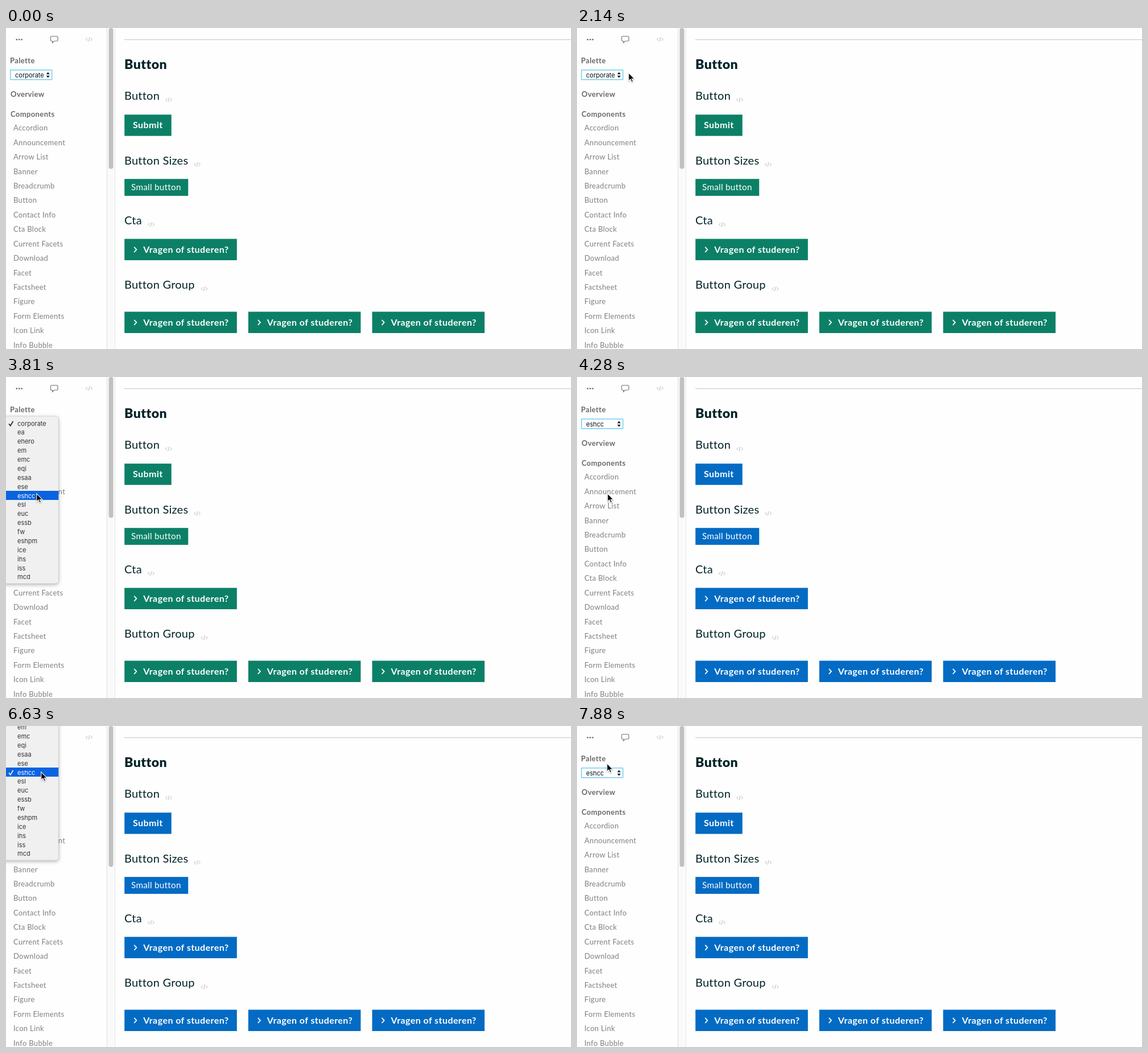
An HTML page that plays this animation: 993x564 px, repeating every 8 s.

```html
<!DOCTYPE html>
<html lang="en">
<head>
<meta charset="utf-8">
<title>Component styleguide</title>
<style>
  html, body { margin: 0; width: 100%; height: 100%; overflow: hidden; background: #fefefe; }
  svg { display: block; }
  text { font-family: Lato, "Open Sans", sans-serif; letter-spacing: .02em; white-space: pre; }
  .nav { font-size: 13px; fill: #808080; letter-spacing: .024em; }
  .section { font-size: 13px; font-weight: 700; fill: #6a6a6a; letter-spacing: .03em; }
  .title { font-size: 23px; font-weight: 900; fill: #002328; }
  .heading { font-size: 20px; font-weight: 400; fill: #002328; letter-spacing: .012em; }
  .label { font-size: 16px; font-weight: 700; fill: #fff; letter-spacing: .027em; }
  .small { font-size: 15.2px; fill: #fff; }
  .system { font: 11px Inter, sans-serif; letter-spacing: 0; fill: #333; }
</style>
</head>
<body>
<svg id="stage" width="993" height="564" viewBox="0 0 993 564"></svg>
<script>
const LOOP = 8000;
const GREEN = [12, 128, 102], BLUE = [3, 107, 195], DARK = [0, 35, 40];
const ROW = 15.88, MENU_TOP = 73.4, SELECTED = 8;

const components = ['Accordion', 'Announcement', 'Arrow List', 'Banner', 'Breadcrumb', 'Button',
  'Contact Info', 'Cta Block', 'Current Facets', 'Download', 'Facet', 'Factsheet', 'Figure',
  'Form Elements', 'Icon Link', 'Info Bubble'];
const palettes = ['corporate', 'ea', 'ehero', 'em', 'emc', 'eqi', 'esaa', 'ese', 'eshcc', 'esl',
  'euc', 'essb', 'fw', 'eshpm', 'ice', 'ihs', 'iss', 'mcd'];

// Pointer moves: start, last step, number of steps, destination
const moves = [
  [360, 360, 1, 844, 401],
  [480, 480, 1, 531, 250],
  [720, 1460, 10, 251, 178],
  [1550, 1640, 2, 255, 182],
  [1910, 2140, 4, 90, 78],
  [2230, 2480, 4, 60, 80],
  [2570, 2570, 1, 60, 80],
  [2930, 3190, 4, 60, 174],
  [3280, 3360, 2, 53, 203],
  [3450, 3450, 1, 53, 204],
  [4780, 4780, 1, 56, 206],
  [4930, 5210, 4, 239.5, 175],
  [5420, 5770, 6, 61, 82],
  [5920, 5920, 1, 61, 82],
  [6630, 6630, 1, 61, 80],
  [6690, 6860, 4, 56, 46],
  [7220, 7360, 3, 52, 65]
];

// Menu: opened, item flashes off, flashes on, starts fading, gone
const menus = [
  { open: 2570, off: 3720, on: 3810, fade: 3900, end: 3990, current: 0 },
  { open: 5920, off: 7590, on: 7648, fade: 7706, end: 7880, current: SELECTED }
];

const hovers = [
  { enter: 1295, dark: 1450, leave: 1910, clear: 2100 },
  { enter: 5117, dark: 5205, leave: 5420, clear: 5600 }
];

const text = (cls, x, y, value) => `<text class="${cls}" x="${x}" y="${y}">${value}</text>`;
const rect = (x, y, w, h, attrs) => `<rect x="${x}" y="${y}" width="${w}" height="${h}" ${attrs}/>`;
const codeIcon = (x, y) =>
  `<path transform="translate(${x} ${y})" d="M3.3-2.8L.5 0L3.3 2.8M8.7-2.8L11.5 0L8.7 2.8M7-3.8L5 3.8" fill="none" stroke="#b8b8b8"/>`;
const heading = (value, y, iconX) => text('heading', 208, y, value) + codeIcon(iconX, y + .3);
const cta = (x, y) => rect(x, y, 197.6, 37.5, 'class="fill"') +
  `<path d="M${x + 17} ${y + 14.3}l4.2 4.5l-4.2 4.5" fill="none" stroke="#fff" stroke-width="1.7"/>` +
  text('label', x + 33, y + 24.2, 'Vragen of studeren?');

const sidebar =
  rect(0, 0, 177, 564, 'fill="#fefefe"') +
  [18.8, 23.2, 27.6].map(x => `<circle cx="${x}" cy="20.3" r="1.4" fill="#707070"/>`).join('') +
  '<path d="M80 14.5H89.5Q91 14.5 91 16V21.5Q91 23 89.5 23H84.5L81.5 26V23H80Q78.5 23 78.5 21.5V16Q78.5 14.5 80 14.5Z" fill="none" stroke="#777" stroke-width="1.2"/>' +
  codeIcon(140, 20) +
  text('section', 7, 62, 'Palette') +
  rect(7, 73, 74.5, 18.5, 'rx="1.5" fill="#8fdcf5"') +
  rect(8, 74, 72.5, 16.5, 'fill="#fff" stroke="#62ccef"') +
  '<text id="value" class="system" x="16" y="86.5" style="fill:#111"></text>' +
  '<path d="M70.8 81.3L73.8 77.4L76.8 81.3ZM70.8 83.7H76.8L73.8 87.6Z" fill="#111"/>' +
  text('section', 8, 120.5, 'Overview') +
  text('section', 8, 156, 'Components') +
  components.map((name, i) => text('nav', 13, 180.3 + i * 25.43, name)).join('') +
  rect(177, 0, 15, 564, 'fill="#fafafa"') +
  rect(177, 0, 1, 564, 'fill="#dedede"') +
  rect(191, 0, 1, 564, 'fill="#e6e6e6"') +
  rect(180.5, 0, 8, 247.5, 'rx="4" fill="#c1c1c1"');

const content =
  rect(208, 20, 785, 1, 'fill="#c4c4c4"') +
  text('title', 208, 71.5, 'Button') +
  heading('Button', 126, 280) +
  rect(208.2, 152.2, 82.5, 37.4, 'id="submit"') + text('label', 223, 176, 'Submit') +
  heading('Button Sizes', 239.5, 330) +
  rect(208.2, 265.2, 112, 29.7, 'class="fill"') + text('small', 220, 285.2, 'Small button') +
  heading('Cta', 345, 249) + cta(208.2, 370.5) +
  heading('Button Group', 458, 342.5) +
  [208.2, 425.8, 643.5].map(x => cta(x, 498.5)).join('');

const menu = '<g id="menu">' +
  rect(-8, 69, 100.3, 294, 'rx="5" fill="#f0f0f0" stroke="#c8c8c8" stroke-width=".7" style="filter:drop-shadow(0 2px 3px rgba(0,0,0,.28))"') +
  rect(0, 0, 92.3, 16, 'id="bar" fill="#0a63e0"') +
  palettes.map((name, i) => `<text class="system item" x="20" y="${85.5 + i * ROW}">${name}</text>`).join('') +
  '<path id="check" d="M5 .5L7.7 4L12.5-4" fill="none" stroke-width="1.7"/></g>';

const pointer = '<g id="pointer" style="filter:drop-shadow(0 1px 1px rgba(0,0,0,.3))">' +
  '<path id="arrow" d="M.8.8V15L4 12L6.2 17L8.6 16L6.4 11.2H10.8Z" fill="#000" stroke="#fff" stroke-width="1.1"/>' +
  '<g id="hand" transform="translate(-4.3 0)"><path d="M3 8V1.5Q3 0 4.3 0T5.6 1.5V6Q5.7 5 6.8 5T8 6.3Q8.2 5.5 9.2 5.7T10.2 7Q10.5 6.4 11.2 6.6T12 8V10.5Q12 12 11 13.5V15.5H4.5V14Q3 12 .6 9.2Q0 8 1 7.4T3 8.6Z" fill="#fff" stroke="#000" stroke-width=".9"/>' +
  '<path d="M6 10V13M7.8 10V13M9.6 10V13" stroke="#000" stroke-width=".8"/></g></g>';

const stage = document.getElementById('stage');
stage.innerHTML = sidebar + content + menu + pointer;
const el = id => document.getElementById(id);
const fills = stage.querySelectorAll('.fill');
const items = stage.querySelectorAll('.item');

const clamp = v => Math.max(0, Math.min(1, v));
const mix = (a, b, k) => a.map((v, i) => v + (b[i] - v) * k);
const smooth = k => k * k * (3 - 2 * k);
const rgb = c => `rgb(${c.map(Math.round)})`;
const show = (node, visible) => node.setAttribute('display', visible ? 'inline' : 'none');

// Current pointer position and the one a step earlier; the menu highlight trails behind.
function pointerAt(t) {
  let from = null, now = null, before = null;
  for (const [start, last, steps, x, y] of moves) {
    if (t < start) break;
    const to = [x, y];
    const gap = (last - start) / (steps - 1 || 1) || 1;
    const step = Math.min(steps, 1 + Math.floor((t - start) / gap + .01));
    const origin = from || to;
    now = mix(origin, to, smooth(step / steps));
    before = mix(origin, to, smooth((step - 1) / steps));
    from = to;
  }
  return { now, before };
}

function drawMenu(t, y) {
  const m = menus.find(m => t >= m.open && t < m.end);
  show(el('menu'), m);
  if (!m) return;
  const shift = Math.round(-m.current * ROW);
  const row = Math.max(0, Math.floor((y - MENU_TOP - shift) / ROW));
  const lit = t < m.off || t >= m.on;
  el('menu').setAttribute('transform', `translate(0 ${shift})`);
  el('menu').setAttribute('opacity', t < m.fade ? 1 : .7 * (1 - (t - m.fade) / (m.end - m.fade)));
  el('bar').setAttribute('y', Math.round(MENU_TOP + row * ROW));
  show(el('bar'), lit);
  items.forEach((item, i) => { item.style.fill = lit && i === row ? '#fff' : '#333'; });
  el('check').setAttribute('transform', `translate(0 ${81.8 + m.current * ROW})`);
  el('check').setAttribute('stroke', lit && row === m.current ? '#fff' : '#222');
}

function draw(t) {
  const changed = t >= 4280;
  const color = changed ? BLUE : GREEN;
  const hover = hovers.reduce((sum, h) => sum +
    clamp((t - h.enter) / (h.dark - h.enter)) - clamp((t - h.leave) / (h.clear - h.leave)), 0);
  fills.forEach(node => node.setAttribute('fill', rgb(color)));
  el('submit').setAttribute('fill', rgb(mix(color, DARK, hover)));
  el('value').textContent = palettes[changed ? SELECTED : 0];

  const { now, before } = pointerAt(t);
  show(el('pointer'), now);
  drawMenu(t, before ? before[1] : 0);
  if (!now) return;
  const [x, y] = now;
  const overButton = x > 208 && x < 291 && y > 152 && y < 190;
  el('pointer').setAttribute('transform', `translate(${x} ${y})`);
  show(el('hand'), overButton);
  show(el('arrow'), !overButton);
}

const began = performance.now();
function tick() {
  draw((performance.now() - began) % LOOP);
  requestAnimationFrame(tick);
}
tick();
</script>
</body>
</html>
```
